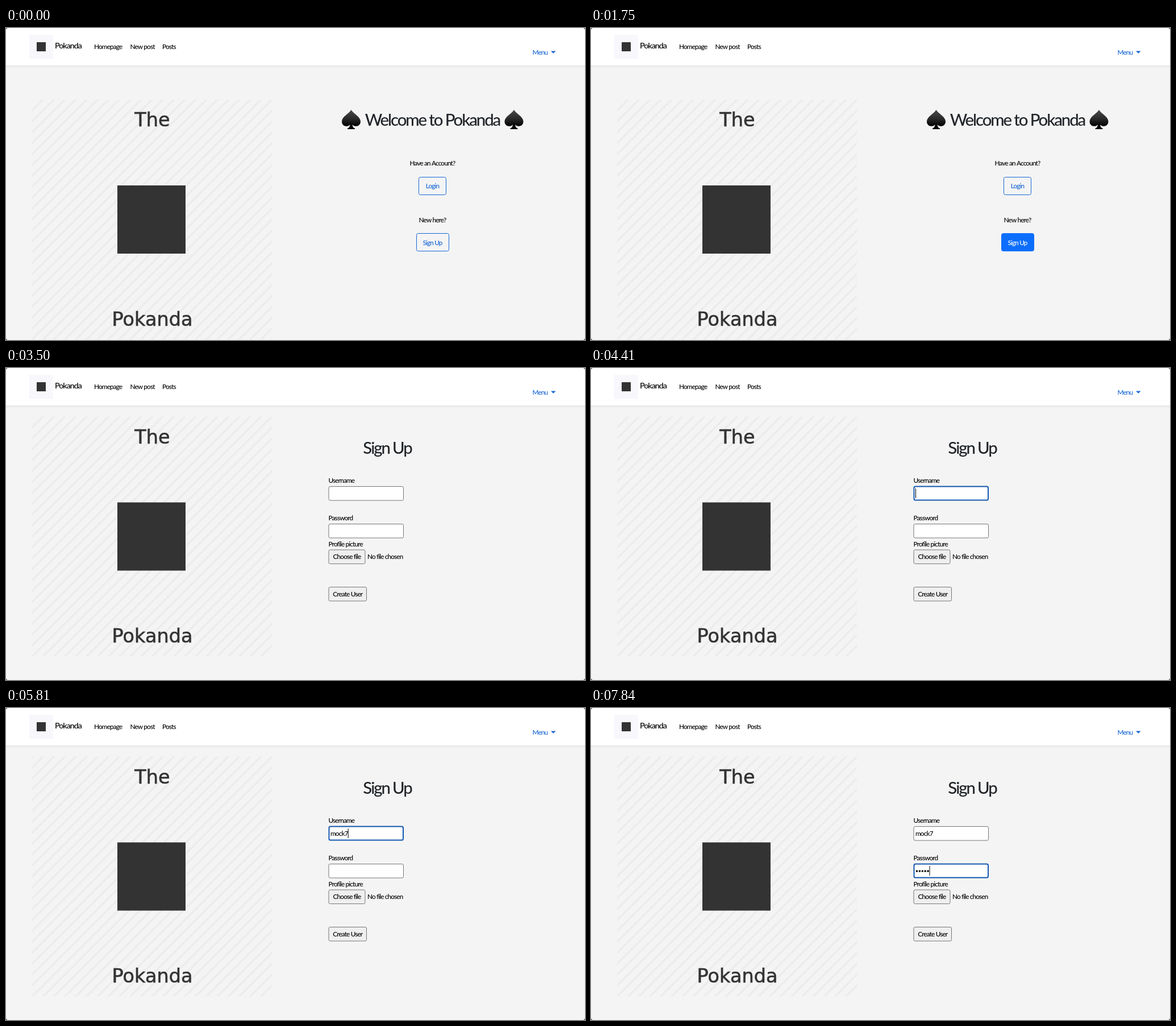
Animation of 1019x549 px, one loop 8 s. Source, as an HTML page with a canvas:

```html
<!DOCTYPE html>
<html lang="en">
<head>
<meta charset="utf-8">
<title>Pokanda</title>
<style>
  html, body { margin: 0; width: 100%; height: 100%; overflow: hidden; background: #f4f4f4; }
  canvas { display: block; width: 1019px; height: 549px; }
</style>
</head>
<body>
<canvas id="stage"></canvas>
<script>
const W = 1019, H = 549, LOOP = 8000;
const BRAND = 'Pokanda', USER = 'mock7', SAVED = 'mock';
const BLUE = '#0d6efd', LINK = '#1766d6', INK = '#212529', MARK = '#333333', PAGE = '#f4f4f4';
const SUGGESTIONS = ['tavvilo', 'pelu', 'bosto', 'wrenly', 'soravel', 'drint'];
const USER_KEYS = [5180, 5390, 5460, 5600, 5810];
const PASSWORD_KEYS = [6650, 6860, 7000, 7210, 7490];

const canvas = document.getElementById('stage');
const ctx = canvas.getContext('2d');
const ratio = window.devicePixelRatio || 1;
canvas.width = W * ratio;
canvas.height = H * ratio;

// Page text is set slightly small and tight to give a narrow look.
const SIZE_SCALE = 0.84, TRACKING = -0.06;

function text(str, x, y, { size = 14, color = '#000', align = 'left' } = {}) {
  ctx.font = `500 ${size * SIZE_SCALE}px Lato, sans-serif`;
  ctx.letterSpacing = `${TRACKING * size}px`;
  ctx.textAlign = align;
  ctx.fillStyle = color;
  ctx.fillText(str, x, y - size * (1 - SIZE_SCALE) * 0.35);
  return ctx.measureText(str).width;
}

function plainText(str, x, y, font, color, align = 'left') {
  ctx.font = font;
  ctx.letterSpacing = '0px';
  ctx.textAlign = align;
  ctx.fillStyle = color;
  ctx.fillText(str, x, y);
}

function posterText(str, y) {
  plainText(str, 257.5, y, '33.5px "DejaVu Sans", sans-serif', MARK, 'center');
  ctx.strokeStyle = MARK;
  ctx.lineWidth = 0.6;
  ctx.strokeText(str, 257.5, y);
}

function rect(x, y, w, h, color) {
  ctx.fillStyle = color;
  ctx.fillRect(x, y, w, h);
}

function box(x, y, w, h, { radius = 2.5, fill, stroke, line = 1 } = {}) {
  ctx.beginPath();
  ctx.roundRect(x, y, w, h, radius);
  if (fill) { ctx.fillStyle = fill; ctx.fill(); }
  if (stroke) { ctx.strokeStyle = stroke; ctx.lineWidth = line; ctx.stroke(); }
}

function withShadow(color, blur, offset, draw) {
  ctx.save();
  ctx.shadowColor = color;
  ctx.shadowBlur = blur * ratio;
  ctx.shadowOffsetY = offset * ratio;
  draw();
  ctx.restore();
}

function navbar() {
  withShadow('rgba(0,0,0,.11)', 4, 1, () => rect(-10, -10, W + 20, 76, '#fff'));
  rect(41, 12, 42, 42, '#f7f7fc');
  rect(54, 25, 16, 16, MARK);
  text(BRAND, 86, 37, { size: 17 });
  text('Homepage', 155, 38);
  text('New post', 218.5, 38);
  text('Posts', 275, 38);
  text('Menu', 926.5, 48, { color: LINK });
  ctx.beginPath();
  ctx.moveTo(959, 40.5);
  ctx.lineTo(967.5, 40.5);
  ctx.lineTo(963.25, 44.8);
  ctx.fillStyle = LINK;
  ctx.fill();
}

function windowCorners() {
  ctx.beginPath();
  ctx.rect(0, 0, W, H);
  ctx.roundRect(0, 0, W, H, 4);
  ctx.fillStyle = '#444';
  ctx.fill('evenodd');
}

function poster(top) {
  const left = 46, side = 422;
  ctx.save();
  ctx.beginPath();
  ctx.rect(left, top, side, side);
  ctx.clip();
  ctx.strokeStyle = '#ececec';
  ctx.lineWidth = 3.5;
  ctx.beginPath();
  for (let x = left; x < left + 2 * side; x += side / 22) {
    ctx.moveTo(x + 5, top - 5);
    ctx.lineTo(x - side - 5, top + side + 5);
  }
  ctx.stroke();
  ctx.restore();
  posterText('The', top + 47);
  rect(196, top + 151, 120, 120, MARK);
  posterText(BRAND, top + 397.5);
}

function spade(cx, top) {
  ctx.save();
  ctx.translate(cx, top);
  const shade = ctx.createLinearGradient(0, 0, 0, 34);
  shade.addColorStop(0, '#4a4a4a');
  shade.addColorStop(0.45, '#2b2b2b');
  shade.addColorStop(0.8, '#050505');
  ctx.fillStyle = shade;
  ctx.beginPath();
  ctx.moveTo(0, 0);
  ctx.bezierCurveTo(4, 7, 16.5, 12, 16.5, 20.5);
  ctx.bezierCurveTo(16.5, 29.5, 6, 31, 2, 26);
  ctx.quadraticCurveTo(2.5, 31.5, 6.5, 32.5);
  ctx.lineTo(6.5, 34);
  ctx.lineTo(-6.5, 34);
  ctx.lineTo(-6.5, 32.5);
  ctx.quadraticCurveTo(-2.5, 31.5, -2, 26);
  ctx.bezierCurveTo(-6, 31, -16.5, 29.5, -16.5, 20.5);
  ctx.bezierCurveTo(-16.5, 12, -4, 7, 0, 0);
  ctx.fill();
  ctx.restore();
}

function welcome(t) {
  const center = 750.5;
  poster(126);
  spade(607.5, 144);
  spade(894, 144);
  text('Welcome to ' + BRAND, center, 174, { size: 35, color: INK, align: 'center' });
  text('Have an Account?', center, 243, { align: 'center' });
  box(726.5, 262.5, 48, 31, { radius: 3, stroke: LINK });
  text('Login', center, 283, { color: LINK, align: 'center' });
  text('New here?', center, 342.5, { align: 'center' });

  const hover = Math.min(1, Math.max(0, Math.floor((t - 1540) / 70) / 3));
  if (t >= 3220) box(720.8, 360, 60, 34, { radius: 4, fill: 'rgba(13,110,253,.3)' });
  box(722.5, 361.5, 57, 31, {
    radius: 3,
    fill: `rgba(13,110,253,${hover})`,
    stroke: hover < 1 ? LINK : BLUE
  });
  const mix = from => Math.round(from + (255 - from) * hover);
  const label = `rgb(${mix(23)},${mix(102)},${mix(214)})`;
  text('Sign Up', center, 382.5, { color: label, align: 'center' });
}

function field(y, focused) {
  if (focused) box(568.5, y, 130.5, 24, { fill: '#fff', stroke: '#1558b0', line: 2 });
  else box(568, y, 131.5, 24.5, { fill: '#fff', stroke: '#767676' });
}

function caret(x, y) {
  rect(x, y, 1, 17, '#000');
}

function button(label, y, width) {
  box(568, y, width, 24.5, { fill: '#efefef', stroke: '#767676' });
  text(label, 568 + width / 2, y + 17, { align: 'center' });
}

function dropdown(names) {
  const row = 30.35;
  withShadow('rgba(0,0,0,.35)', 3, 1, () =>
    box(567.5, 234, 162, 44.5 + (names.length - 1) * row, { radius: 3, fill: '#fff' }));
  names.forEach((name, i) =>
    plainText(name, 577.5, 260 + i * row, '600 11px Inter, sans-serif', '#1f1f1f'));
}

function signUp(t) {
  const typed = keys => keys.filter(time => t >= time).length;
  const onUser = t >= 4410 && t < 6230, onPassword = t >= 6230;
  const userName = USER.slice(0, typed(USER_KEYS));
  const dots = typed(PASSWORD_KEYS);

  poster(85.5);
  text('Sign Up', 671, 153, { size: 35, color: INK, align: 'center' });
  text('Username', 567.5, 203);
  field(208.5, onUser);
  const width = text(userName, 571, 226);
  if (onUser && !(t >= 4900 && t < 5180)) caret(571 + width, 212);

  text('Password', 567.5, 269);
  field(274.5, onPassword);
  ctx.fillStyle = '#000';
  for (let i = 0; i < dots; i++) {
    ctx.beginPath();
    ctx.arc(573.5 + i * 4.9, 287, 1.8, 0, 2 * Math.PI);
    ctx.fill();
  }
  if (onPassword) caret(571 + dots * 4.9, 278);

  text('Profile picture', 567.5, 314.5);
  button('Choose file', 320, 64);
  text('No file chosen', 636, 337);
  button('Create User', 385.5, 66.5);

  if (t >= 4480 && t < 5180) dropdown(SUGGESTIONS);
  else if (t >= 5180 && t < 5600) dropdown([SAVED]);
}

function draw(t) {
  ctx.setTransform(ratio, 0, 0, ratio, 0, 0);
  rect(0, 0, W, H, PAGE);
  navbar();
  (t < 3500 ? welcome : signUp)(t);
  windowCorners();
}

const start = performance.now();
function frame() {
  draw((performance.now() - start) % LOOP);
  requestAnimationFrame(frame);
}
frame();
</script>
</body>
</html>
```
